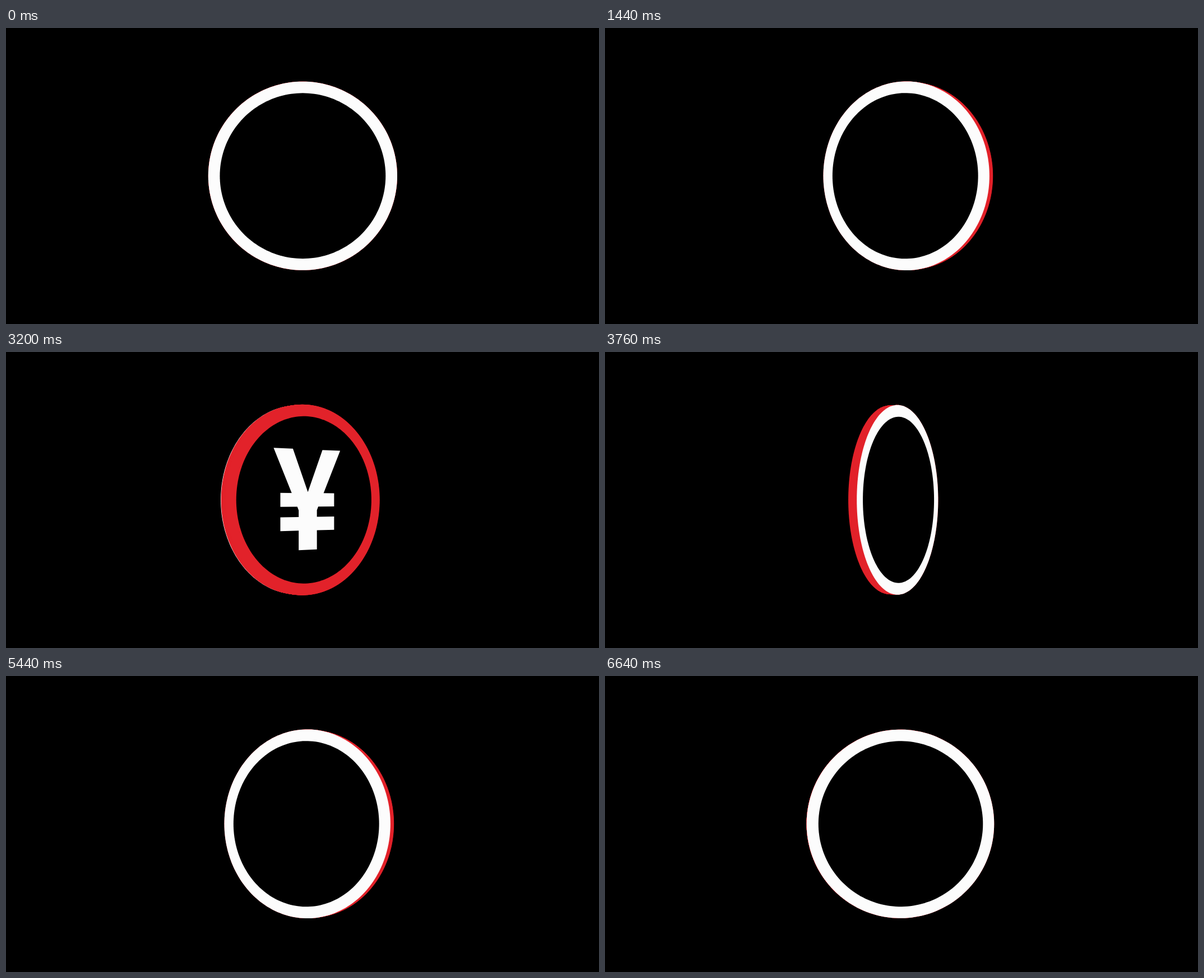
These frames come from a looping animation (1058 by 529 pixels, 6720 ms). An HTML page with a canvas:

```html
<!DOCTYPE html>
<html lang="en">
<head>
<meta charset="utf-8">
<title>Spinning coin</title>
<style>
  html, body { margin: 0; width: 100%; height: 100%; overflow: hidden; background: #000; }
  canvas { display: block; width: 100%; height: 100%; }
</style>
</head>
<body>
<canvas id="stage" width="1058" height="529"></canvas>
<script>
const ctx = document.getElementById('stage').getContext('2d');
const WHITE = '#fcfcfc', RED = '#e2222a', BLACK = '#000';
const CENTER_X = 529.4, CENTER_Y = 264.25, CAMERA = 1457;
const OUTER = 168.6, INNER = 147.9, THICKNESS = 15.5, WHITE_EDGE = 1.3;
const LOOP = 6720, STEP = 80, DEGREES_PER_STEP = -21.6;

// Right half of the yen sign, from the crotch round to the foot
const yenHalf = [
  [0, -14], [32.4, -89.5], [73, -89.5], [35, -12], [59, -12], [59, 12],
  [23, 12], [20, 18.5], [20, 30.3], [59, 30.3], [59, 54.2], [20, 54.2], [20, 88.5]
];
const yen = [...yenHalf, ...yenHalf.slice(1).reverse().map(([x, y]) => [-x, y])];

const circle = radius => Array.from({ length: 180 }, (_, i) => {
  const a = i * Math.PI / 90;
  return [radius * Math.cos(a), radius * Math.sin(a)];
});
const outerCircle = circle(OUTER), innerCircle = circle(INNER);

// Fills a flat shape lying parallel to the coin, at a depth behind its white face
function fillShape(points, depth, angle, color) {
  const c = Math.cos(angle), s = Math.sin(angle);
  ctx.beginPath();
  for (const [px, py] of points) {
    const x = px * c - depth * s, z = -px * s - depth * c;
    const scale = CAMERA / (CAMERA - z);
    ctx.lineTo(CENTER_X + x * scale, CENTER_Y + py * scale);
  }
  ctx.closePath();
  ctx.fillStyle = color;
  ctx.fill();
}

function fillRim(from, to, angle) {
  const layers = 16;
  for (let i = 0; i <= layers; i++) {
    fillShape(outerCircle, from + (to - from) * i / layers, angle, RED);
  }
}

function draw(time) {
  const step = Math.floor(time % LOOP / STEP);
  const angle = step * DEGREES_PER_STEP * Math.PI / 180;
  ctx.fillStyle = BLACK;
  ctx.fillRect(0, 0, 1058, 529);

  if (Math.cos(angle) > 0) {
    fillRim(THICKNESS, 0, angle);
    fillShape(outerCircle, 0, angle, WHITE);
    fillShape(innerCircle, 0, angle, BLACK);
  } else {
    fillShape(outerCircle, 0, angle, WHITE);
    fillRim(WHITE_EDGE, THICKNESS, angle);
    fillShape(innerCircle, THICKNESS, angle, BLACK);
    fillShape(yen, THICKNESS, angle, WHITE);
  }
}

function tick() {
  draw(performance.now());
  requestAnimationFrame(tick);
}
tick();
</script>
</body>
</html>
```
